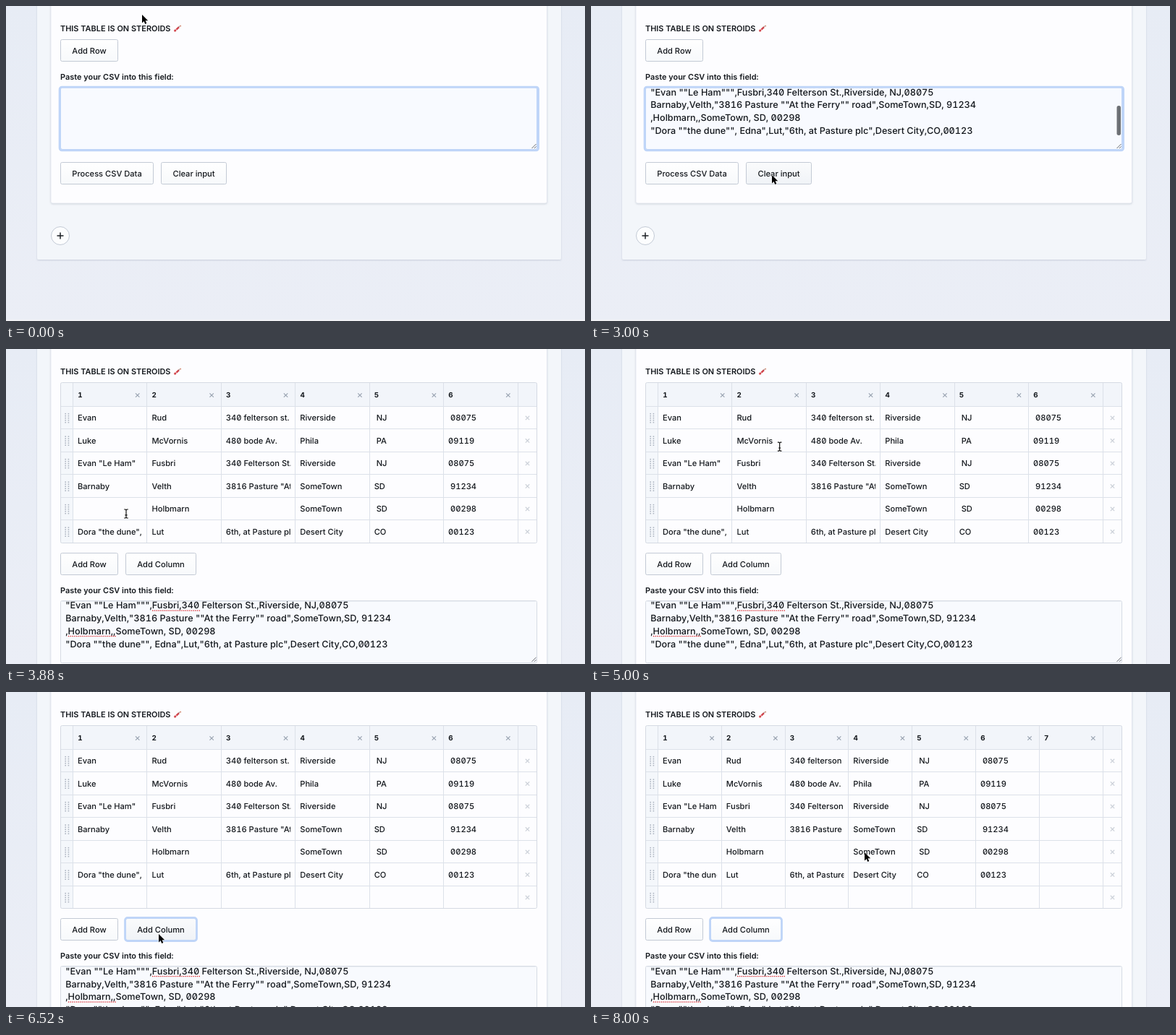
An HTML page that plays this animation: 800x436 px, repeating every 8.08 s.

```html
<!DOCTYPE html>
<html lang="en">
<head>
<meta charset="utf-8">
<title>CSV table</title>
<style>
  html, body { margin: 0; width: 100%; height: 100%; overflow: hidden; background: #e9edf5; }
  svg { display: block; }
  #stage { width: 800px; height: 436px; }
  text {
    font: 450 11.12px Inter, sans-serif;
    font-feature-settings: "zero", "tnum";
    text-rendering: geometricPrecision;
    white-space: pre;
    fill: #14181d;
  }
  text.label { font-size: 10.92px; font-weight: 600; }
  text.head { font-size: 9.8px; font-weight: 650; }
  text.csv { font-size: 12.65px; }
</style>
</head>
<body>
<svg id="stage" viewBox="0 0 800 436">
  <defs>
    <linearGradient id="page" x2="0" y2="1">
      <stop stop-color="#e7ecf5"/><stop offset="1" stop-color="#ebeef6"/>
    </linearGradient>
    <linearGradient id="button" x2="0" y2="1">
      <stop stop-color="#ffffff"/><stop offset="1" stop-color="#f7f9fb"/>
    </linearGradient>
    <linearGradient id="hover" x2="0" y2="1">
      <stop stop-color="#fafbfc"/><stop offset="1" stop-color="#f0f3f7"/>
    </linearGradient>
    <filter id="shadow" x="-5%" y="-5%" width="110%" height="110%">
      <feDropShadow dx="0" dy="1" stdDeviation=".9" flood-color="#5a6b85" flood-opacity=".25"/>
    </filter>
  </defs>
  <g id="scene"></g>
  <rect id="bar" x="726.5" y="138" width="5.5" height="41" rx="2.7" fill="#6d7075"/>
  <path id="caret" d="M82.5 0v15" stroke="#1c2026"/>
  <g id="pointer"></g>
</svg>
<script>
const LOOP = 8080;
const PASTE = 2400, PROCESS = 3680, TABLE = 3760, BEAM = 3880;
const ROW_FOCUS = 5800, ROW_ADDED = 5920, ARROW = 6080, COL_FOCUS = 6480, COL_ADDED = 6600;
const ROW = 31.5, LEFT = 75, RIGHT = 734, FIRST = 92.5, LAST = 707, HEAD = 47;
const RING = '#bfd5f8';

const $ = id => document.getElementById(id);

const rows = [
  ['Evan', 'Rud', '340 felterson st.', 'Riverside', ' NJ', ' 08075'],
  ['Luke', 'McVornis', '480 bode Av.', 'Phila', ' PA', '09119'],
  ['Evan "Le Ham"', 'Fusbri', '340 Felterson St.', 'Riverside', ' NJ', '08075'],
  ['Barnaby', 'Velth', '3816 Pasture "At the Ferry" road', 'SomeTown', 'SD', ' 91234'],
  ['', 'Holbmarn', '', 'SomeTown', ' SD', ' 00298'],
  ['Dora "the dune", Edna', 'Lut', '6th, at Pasture plc', 'Desert City', 'CO', '00123']
];
const csv = [
  '"Evan ""Le Ham""",Fusbri,340 Felterson St.,Riverside, NJ,08075',
  'Barnaby,Velth,"3816 Pasture ""At the Ferry"" road",SomeTown,SD, 91234',
  ',Holbmarn,,SomeTown, SD, 00298',
  '"Dora ""the dune"", Edna",Lut,"6th, at Pasture plc",Desert City,CO,00123'
];
const misspelled = ['Fusbri,340', '', 'Holbmarn,,', ''];

// time, x, y of the pointer's hot spot
const path = [
  [80, 188, 12], [300, 226, 52], [600, 160, 149], [880, 116, 131], [1320, 85, 129],
  [1480, 85, 129], [1700, 73, 114], [1960, 150, 152], [2200, 184, 153],
  [2780, 184, 153], [3000, 250, 234], [3120, 250, 234], [3500, 166, 228],
  [4320, 166, 228], [4650, 311, 180], [4880, 290, 121], [5120, 232, 149],
  [5200, 230, 150], [5680, 131, 296], [6080, 131, 296], [6420, 211, 335],
  [6780, 211, 335], [6920, 235, 338], [7140, 330, 378], [7360, 568, 280],
  [7560, 480, 180], [7740, 398, 238], [8000, 378, 222]
];

function pointerAt(t) {
  const next = path.findIndex(p => p[0] > t);
  if (next === 0) return path[0].slice(1);
  if (next < 0) return path[path.length - 1].slice(1);
  const [t0, x0, y0] = path[next - 1], [t1, x1, y1] = path[next];
  const u = (t - t0) / (t1 - t0), k = u * u * (3 - 2 * u);
  return [x0 + (x1 - x0) * k, y0 + (y1 - y0) * k];
}

const snap = v => Math.floor(v) + .5;
const rect = (x, y, w, h, attrs) => `<rect x="${x}" y="${y}" width="${w}" height="${h}" ${attrs}/>`;
const text = (x, y, s, attrs = '') => `<text x="${x}" y="${y}" ${attrs}>${s}</text>`;
const line = (d, color, width = 1) => `<path d="${d}" fill="none" stroke="${color}" stroke-width="${width}"/>`;
const cross = (x, y, color) => line(`M${x - 2.7} ${y - 2.7}l5.4 5.4m0 -5.4l-5.4 5.4`, color, 1.2);

function button(b, s) {
  const focused = s.focus === b.name;
  const ring = focused
    ? rect(b.x - 1, b.y - 1, b.w + 2, b.h + 2, `rx="3.5" fill="none" stroke="${RING}" stroke-width="2.8"`) : '';
  const fill = s.hover === b.name ? 'hover' : 'button';
  return rect(b.x, b.y, b.w, b.h, `rx="2" fill="url(#${fill})" stroke="${focused ? RING : '#c3cad5'}"`) + ring +
    text(b.x + b.w / 2, b.y + 19, b.name, 'text-anchor="middle"');
}

function buttons(s) {
  const top = s.table ? snap(282 + s.extra) : 46.5;
  const list = [
    { name: 'Add Row', x: 75.5, y: top, w: 79, h: 30 },
    { name: 'Process CSV Data', x: 75.5, y: 216.5 + s.shift, w: 128, h: 30 },
    { name: 'Clear input', x: 214.5, y: 216.5 + s.shift, w: 90, h: 30 }
  ];
  if (s.table) list.push({ name: 'Add Column', x: 165.5, y: top, w: 97, h: 30 });
  return list;
}

function table(s) {
  const count = rows.length + (s.extra ? 1 : 0), first = HEAD + 32.3;
  const bottom = snap(first + count * ROW), step = (LAST - FIRST) / s.columns;
  let out = rect(LEFT, HEAD, RIGHT - LEFT, bottom - HEAD, 'fill="#fdfdff"') +
    rect(LEFT, HEAD, RIGHT - LEFT, 32, 'fill="#f2f5fa"') +
    rect(LEFT, HEAD, FIRST - LEFT, bottom - HEAD, 'fill="#f4f7fb"');
  let grid = `M${FIRST} ${HEAD}V${bottom}`;
  for (let c = 0; c < s.columns; c++) {
    const x = FIRST + c * step;
    grid += `M${snap(x + step)} ${HEAD}V${bottom}`;
    out += text(x + 6.7, 66.6, c + 1, 'class="head"') + cross(x + step - 13.2, 64, '#98a2b0');
  }
  for (let r = 0; r < count; r++) {
    const y = first + r * ROW, mid = y + ROW / 2 + .4;
    grid += `M${LEFT} ${snap(y)}H${RIGHT}`;
    for (let d = 0; d < 10; d++)
      out += rect(81.4 + d % 2 * 4.2, mid - 6.6 + (d >> 1) * 3, 1.6, 1.6, 'fill="#adb4c0"');
    (rows[r] || []).forEach((cell, c) => {
      out += `<svg x="${FIRST + c * step + 6.5}" y="${y}" width="${step - 13}" height="${ROW}">` +
        text(0, 20.2, cell) + '</svg>';
    });
    out += cross(720.5, mid, '#ccd1d9');
  }
  return out + line(grid, '#dce1e9') +
    rect(LEFT + .5, HEAD - .5, RIGHT - LEFT - 1, bottom - HEAD + .5, 'rx="2" fill="none" stroke="#d5dae3"');
}

function field(s) {
  const y = 113 + s.shift, focused = s.focus === 'field';
  let out = rect(75.5, snap(y - .5), 658, 86, focused
    ? `rx="2.5" fill="#f8faff" stroke="${RING}"`
    : 'rx="2" fill="#f8fafe" stroke="#d6dbe4"');
  out += focused
    ? rect(74.2, y - .8, 661.3, 87.6, `rx="3" fill="none" stroke="${RING}" stroke-width="3"`)
    : line(`M76 ${snap(y + .5)}H733`, '#eceff4');
  if (s.pasted) {
    out += `<svg x="75" y="${y}" width="650" height="86">` +
      csv.map((l, i) => text(7.2, 10.6 + i * 17.75, l, `class="csv" data-mark="${s.table ? misspelled[i] : ''}"`)).join('') +
      '</svg>';
  }
  return out + line(`M726.5 ${y + 84}l6 -6m-2.6 6l2.6 -2.6`, '#55595f', .9);
}

// dotted red underline below misspelled words
function underline(node) {
  const word = node.dataset.mark;
  if (!word) return;
  const start = node.textContent.indexOf(word);
  const a = node.getStartPositionOfChar(start), b = node.getEndPositionOfChar(start + word.length - 1);
  node.insertAdjacentHTML('afterend',
    `<path d="M${a.x + 1} ${a.y + 2.6}H${b.x}" stroke="#e0383c" stroke-width="1.7" stroke-linecap="round" stroke-dasharray="0 2.8"/>`);
}

const firecracker =
  line('M232.6 35l2.2 -2M235.4 32.6l3.6 -3.4', '#d2454c', 2.5) +
  line('M238.6 29.4q.6 -2 2.6 -1.8', '#7d6a64', .8) +
  '<circle cx="241.2" cy="27.6" r=".9" fill="#d98468"/>';

function draw(s) {
  const foot = s.table ? '' : rect(0, 434, 800, 2, 'fill="#f1f2f5"');
  $('scene').innerHTML =
    rect(0, 0, 800, 436, 'fill="url(#page)"') + foot +
    rect(43, -20, 724, 371 + s.shift, 'rx="2" fill="#f3f6fa" filter="url(#shadow)"') +
    rect(62, -20, 685.5, 293 + s.shift, 'rx="2.5" fill="#fdfdff" stroke="#dae0e9" stroke-width=".6" filter="url(#shadow)"') +
    text(75, 34.7, 'THIS TABLE IS ON STEROIDS', 'class="label"') + firecracker +
    (s.table ? table(s) : '') +
    text(75, 101.8 + s.shift, 'Paste your CSV into this field:', 'class="label"') +
    field(s) + buttons(s).map(b => button(b, s)).join('') +
    `<circle cx="75" cy="${318 + s.shift}" r="12.5" fill="#fcfdfe" stroke="#c3cad5"/>` +
    line(`M70.5 ${318 + s.shift}h9m-4.5 -4.5v9`, '#1c2026', 1.5);
  document.querySelectorAll('[data-mark]').forEach(underline);
}

function stateAt(t, [x, y]) {
  const s = {
    table: t >= TABLE,
    pasted: t >= PASTE,
    extra: t >= ROW_ADDED ? ROW : 0,
    columns: t >= COL_ADDED ? 7 : 6,
    focus: t < PROCESS ? 'field' : t < TABLE ? 'Process CSV Data'
      : t < ROW_FOCUS ? '' : t < COL_FOCUS ? 'Add Row' : 'Add Column'
  };
  s.shift = s.table ? 235.8 + s.extra : 0;
  const over = buttons(s).find(b => x > b.x && x < b.x + b.w && y > b.y && y < b.y + b.h);
  s.hover = over ? over.name : '';
  return s;
}

function caretOn(t) {
  if (t >= PROCESS) return false;
  return t < PASTE ? (t + 520) % 1000 < 500 : (t - PASTE) % 1000 < 500;
}

const arrow = '<path d="M0 0V11.4L2.6 9 4.3 12.9 6.3 12 4.6 8.2H8.2Z" fill="#000" stroke="#fff" stroke-width="1" paint-order="stroke" stroke-linejoin="round"/>';
const beamPath = 'M-2.8 -6H-1L0 -5 1 -6H2.8M0 -5V5M-2.8 6H-1L0 5 1 6H2.8M-1.6 1.8H1.6';
const beam = line(beamPath, '#fff', 2.4) + line(beamPath, '#111', 1.2);

let lastKey = '', lastShape = '';
function frame() {
  const t = performance.now() % LOOP;
  const at = pointerAt(t), s = stateAt(t, at), key = JSON.stringify(s);
  if (key !== lastKey) { draw(s); lastKey = key; }

  const shape = t >= BEAM && t < ARROW ? beam : arrow;
  if (shape !== lastShape) { $('pointer').innerHTML = shape; lastShape = shape; }
  $('pointer').setAttribute('transform', `translate(${at[0]} ${at[1]})`);

  $('caret').setAttribute('transform', `translate(0 ${t < PASTE ? 122 : 183})`);
  $('caret').setAttribute('opacity', caretOn(t) ? 1 : 0);
  const fade = Math.min(1, Math.max(0, (3400 - t) / 200));
  $('bar').setAttribute('opacity', t < PASTE ? 0 : fade);
  requestAnimationFrame(frame);
}
frame();
</script>
</body>
</html>
```
